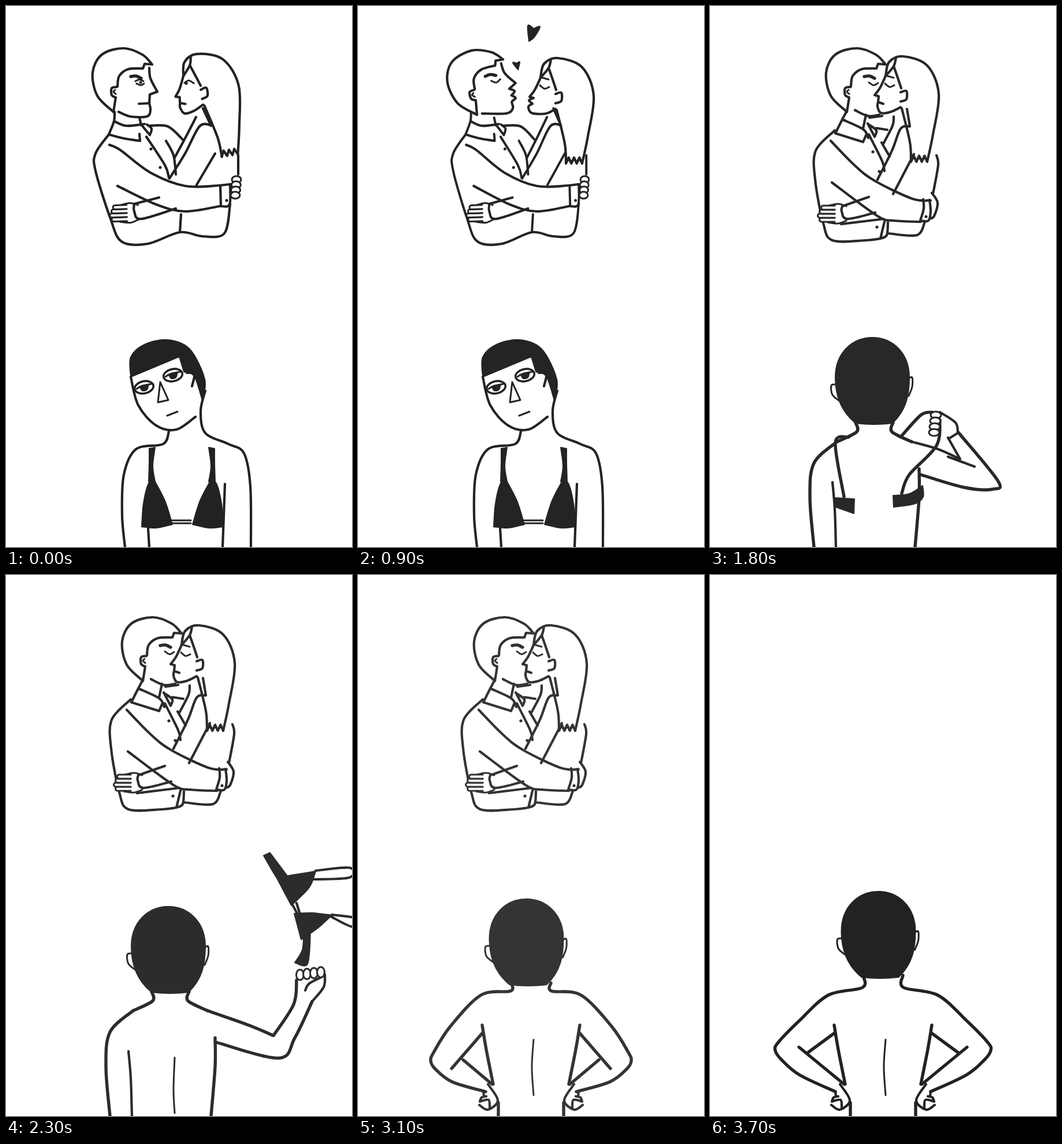
These frames come from a looping animation (599 by 935 pixels, 4.2 s). An HTML page:

```html
<!DOCTYPE html>
<html lang="en">
<head>
<meta charset="utf-8">
<title>Embrace</title>
<style>
html, body { margin: 0; width: 100%; height: 100%; overflow: hidden; background: #fff; }
svg { display: block; width: 100%; height: 100%; fill: none; stroke: currentColor; stroke-linecap: round; stroke-linejoin: round; }
</style>
</head>
<body>
<svg id="stage" viewBox="0 0 599 935"></svg>
<script>
const THIN = 3, PEN = 4.2, BOLD = 5.4;

// Smooth curve through key points; "!" marks a corner, a final "z" closes.
function curve(stroke) {
  const words = stroke.trim().split(' ');
  const closed = words.at(-1) === 'z';
  if (closed) words.pop();
  const pts = words.map(w => ({ p: w.replace('!', '').split(',').map(Number), hard: w.endsWith('!') }));
  const last = pts.length - 1;
  const at = i => closed ? pts.at(i % pts.length) : pts[Math.max(0, Math.min(last, i))];
  let d = 'M' + pts[0].p;
  for (let i = 0; i < last + closed; i++) {
    const a = at(i), b = at(i + 1);
    const before = a.hard ? a : at(i - 1), after = b.hard ? b : at(i + 2);
    const c1 = a.p.map((v, k) => v + (b.p[k] - before.p[k]) / 6);
    const c2 = b.p.map((v, k) => v - (after.p[k] - a.p[k]) / 6);
    d += `C${c1} ${c2} ${b.p}`;
  }
  return d;
}

const path = (d, width, fill = 'none') => `<path d="${d}" stroke-width="${width}" fill="${fill}"/>`;
const line = (text, width = PEN) => path(text.split('/').map(curve).join(''), width);
const solid = text => path(curve(text), 2, 'currentColor');
const group = (move, art) => `<g transform="${move}">${art}</g>`;
const shift = (x, y, art) => group(`translate(${x} ${y})`, art);
const mirror = (sum, art) => group(`matrix(-1 0 0 1 ${sum} 0)`, art);
const squeeze = (k, art) => group(`translate(${362 * (1 - k)}) scale(${k} 1)`, art);
const repeat = (count, draw) => Array.from({ length: count }, (_, i) => draw(i)).join('');
const oval = (x, y, rx, ry, fill, width = THIN) =>
  `<ellipse cx="${x}" cy="${y}" rx="${rx}" ry="${ry}" fill="${fill}" stroke-width="${width}"/>`;
const dot = (x, y) => oval(x, y, 1.6, 1.6, 'currentColor', 2);

const hand = (x, y, angle) => group(`translate(${x} ${y}) rotate(${angle})`,
  line('0,-12 14,-17 32,-15/0,13 14,17 30,14', THIN) +
  repeat(4, i => path(`M20,${i * 7 - 14}H${46 - 3 * Math.abs(i - 1)}a3.5,3.5 0 0 1 0,7H20`, THIN, '#fff')));

const knuckles = (x, y, dx, dy, rx, ry) => repeat(4, i => oval(x + dx * i, y + dy * i, rx, ry, '#fff'));

function spikes(x, y, width, count, depth) {
  const step = width / count / 2;
  return line(repeat(count * 2 + 1, i => `${x - step * i},${y - (i % 2 ? depth : 0)}! `));
}

// Heads, turned about the nape and the chin.
const manMouth = {
  calm: '248,107 250,125 262,148! 249,153! 248,168! 230,169/248,168 250,180 244,191 215,191 195,183',
  pucker: '248,107 250,125 264,146! 251,153! 259,159 252,165! 258,171 250,176 249,187 236,193 195,183',
  open: '248,107 254,122 268,144! 251,153! 256,162 244,171! 256,176 253,187 240,190 215,187',
  kiss: '200,180 222,190 242,188'
};
const manEye = {
  open: line('224,130 231,127 238,130/226,134 233,137 239,134', THIN) + dot(233, 132),
  shut: line('224,132 232,137 240,133', THIN)
};
const man = (x, y, angle, mouth, eye) => group(`translate(${x} ${y}) rotate(${angle}) translate(-186 -183)`,
  line('186,183 158,155 150,115 166,84 203,73 236,84 253,101! 240,100! 237,108! 212,109 196,121 193,139') +
  line('192,140 183,142 183,154 190,158! 186,183') + line('189,145 186,148 190,152', THIN) +
  line('216,122 225,121 234,125', BOLD) + line(manMouth[mouth]) + manEye[eye]);

const womanMouth = {
  calm: '304,159! 303,169! 312,172/303,169 302,177 308,188 325,186 342,178',
  pucker: '304,159! 296,163 302,169! 295,174 301,185 325,186 342,178',
  open: '304,159! 299,166 306,172! 297,178 302,187 325,186 342,178'
};
const womanEye = {
  open: line('316,136 324,133 332,139', THIN) + dot(319, 137),
  shut: line('315,137 323,143 331,140/316,123 330,127', THIN)
};
const woman = (x, y, angle, mouth, eye) => group(`translate(${x} ${y}) rotate(${angle}) translate(-306 -187)`,
  line('316,124 322,100 346,90 388,106 408,155 398,225 388,272/360,272 358,238 344,180') +
  spikes(388, 272, 28, 3, 10) +
  line('334,92 330,107 316,124/330,107 337,127 343,145/342,152 352,150 352,164 342,168') +
  line('316,124 306,145 297,157! ' + womanMouth[mouth]) + womanEye[eye]);

// Couple
const hug =
  line('188,183 187,199 178,222! 205,229 232,233! 231,221/187,199 208,207 240,204/235,206 249,223! 252,212 244,205/231,193 234,206') +
  line('178,222 155,255 155,285 180,365 200,407 245,411 301,391 340,398 378,393 388,342/303,360 301,391') +
  line('179,240 198,249 250,288 310,311 371,310/193,311 260,343 310,355 370,346') +
  line('371,310! 372,346! 387,343 388,308! 371,310') + knuckles(399, 300, -.7, 9, 8, 6) +
  line('243,226 275,275 282,297/247,207 280,208 306,231/277,233 290,258 294,291') +
  line('329,192 312,225 292,262/355,206 335,208 310,255 283,298/362,255 330,309/341,177 355,207/402,258 402,291') +
  line('265,331 222,342! 222,355 234,368 294,350') + hand(229, 357, 178) +
  dot(251, 247) + dot(267, 279) + dot(382, 336);
const leaning = group('matrix(.933 0 0 1 20.2 0)', hug);

const kiss = man(237, 183, 0, 'kiss', 'shut') + woman(294, 184, 0, 'calm', 'shut') +
  line('236,183 229,196 217,220! 265,235! 271,221/229,196 265,213 274,228/270,188 265,212/273,203 285,226! 288,215 275,205/276,193 298,190/288,211 307,214') +
  line('216,215 183,250 182,300 196,375 212,405 270,405 295,402! 302,373/308,374 306,396 295,402/227,377 300,368/309,393 358,396 372,373') +
  line('209,233 250,275 285,302 350,333 382,336/211,305 290,363 320,371 365,373') +
  line('369,334 370,350 364,371! 378,371 382,355 380,335/384,323 394,340 388,363 380,368') +
  line('275,222 298,268 302,285/297,236 311,260/318,191 316,207 300,238/346,208 330,212 315,250 290,300/353,256 317,325/341,178 346,208/392,258 395,275 386,325') +
  line('275,330 229,346! 228,355 238,368 286,357') + hand(236, 359, 180) +
  dot(282, 252) + dot(293, 286) + dot(374, 364) + dot(289, 382);

const manReach = man(46, 208, -31, 'open', 'open') +
  line('47,213 48,241! 97,243! 95,221 72,222 47,214/85,190 92,208 108,225! 117,222 95,209') +
  line('48,241 30,270 50,325 108,408 145,408 205,375! 202,343/188,343 197,378') +
  line('104,209 145,206 205,216 234,213/122,213 158,245 182,292/165,250 215,256 243,250') +
  line('54,261 145,292 238,286/82,325 160,341 246,320') +
  line('234,213! 243,249! 259,240 254,212! 234,213/238,286! 246,319! 262,311 255,281! 238,286') +
  hand(261, 225, -4) + hand(264, 293, -16) +
  repeat(2, i => dot(122 + 25 * i, 247 + 27 * i)) + dot(184, 360) + dot(255, 308);

const womanReach = woman(512, 208, 6, 'open', 'open') +
  line('525,208 523,233 512,247/404,212 465,237 523,233/394,240 440,260 480,264/404,212 394,240') +
  line('388,270 430,274 475,272 548,240/383,297 465,310 532,284/388,270 383,297') +
  line('460,312 435,388! 460,405 505,423! 540,375 575,300', BOLD) +
  hand(398, 225, 200) + hand(386, 283, 214);

const reach = (left, right) => shift(left, 0, manReach) + shift(right, 0, womanReach);

const hearts = solid('296,61! 294,34 304,39! 315,36 305,54 z') + solid('277,110! 268,98 275,99! 280,97 z');

// Third figure, from the front
const eye = (x, y) => group(`translate(${x} ${y}) rotate(-12)`,
  oval(0, 0, 16.5, 10.5, 'none', 3.6) + line('-13,0 -4,-3 14,-3', THIN) + solid('-7,-2! -4,5 4,5 8,-2! z'));

const strap = solid('248,765! 258,763! 254,795 258,822! 247,822! 248,790 z');
const cup = solid('258,822! 247,825 238,860 235,900! 260,902 288,896! 275,855 z');

const front =
  solid('216,641! 216,607 240,585 280,577 318,593 344,645 340,682! 326,640 308,632! 300,606! z') +
  line('216,641 229,690 260,725 295,732 328,710/282,735 272,757 225,766 204,810 201,880 206,935') +
  line('345,665 337,700 345,738 385,757 412,773 423,830 424,935/246,902 248,935/379,826 375,935/313,634 326,636 322,657') +
  line('267,650 263,685! 281,681! 267,650/279,708 297,701/287,889 320,889/287,894 320,894', THIN) +
  eye(239, 659) + eye(289, 638) + strap + cup + mirror(609, strap) + mirror(611, cup);

// Third figure, from behind
const backHead =
  path('M252,721C226,700 217,672 217,642C217,600 246,573 281,573C316,573 345,600 345,642C345,672 340,698 316,721Q283,725 252,721Z', 2, 'currentColor') +
  line('217,654 210,656 212,672 226,684/344,644 350,642 350,658 344,674', THIN);
const neck = line('252,720 254,736 220,753', BOLD);
const hangingArm = line('220,753 180,790 173,850 180,935', BOLD);
const body = backHead + neck + hangingArm + mirror(569, neck) +
  line('212,823 216,870 218,935') + line('362,800 362,850 355,935', BOLD);
const spine = line('292,834 290,890 292,930', THIN);
const armDown = mirror(569, hangingArm);

const dressed = body + line('240,745 217,755 232,848', BOLD) +
  solid('217,850! 250,852! 249,877! 218,866! z') + solid('317,846! 345,843 368,829! 369,848 355,860 318,866! z');

const pullArm = line('349,753 395,766 433,783! 412,746/412,779 458,796') +
  line('365,810 440,832 490,835 498,820 430,737/330,745 365,707 385,702/332,842 345,810 392,760 398,715', BOLD) +
  line('398,702 425,720 429,738! 413,748') + knuckles(391, 707, -1, 10, 9, 6);

const throwArm =
  line('349,753 420,778 463,796! 498,742 503,700/365,808 472,835 500,800 530,737', BOLD) +
  line('552,690 550,712 530,737/548,694 525,706 518,718') + knuckles(509, 691, 12, -1.5, 6.5, 9);

const bra =
  solid('446,485! 457,480! 487,520! 474,530 z') + solid('469,524! 487,520 536,512! 525,540 494,571! z') +
  solid('499,585! 530,584 564,588! 540,610 511,630! z') + solid('515,622! 527,618! 522,672 500,670! 513,648 z') +
  line('536,511 595,506 594,523 530,526/496,570 503,583/503,567 508,583/564,587 615,595 600,608 562,590');

// Hands on hips; k runs from raised (0) to lowered (1) shoulders.
function hips(k) {
  const p = (x, y, dx = 0, dy = 0) => `${x + dx * k},${y + dy * k} `;
  const side =
    line(p(265, 692, 0, 13) + p(264, 713, 0, 6) + p(205, 726, 8) + p(155, 770, 5, 10) + p(118, 808, 13, 17) +
      p(113, 822, 13, 18) + p(124, 838, 10, 16) + p(155, 864, 8, 12) + p(217, 893, 4), BOLD) +
    line('215,778 222,820 234,880/215,792 ' + p(170, 825, -8, 28) + '/' + p(154, 816, 28, 22) + '232,880/243,912 243,935', BOLD) +
    line('225,880 242,908 225,924 210,916/217,892 218,901/228,920 226,907 211,910! 214,903 222,901');
  return shift(10.5, -26 + 13 * k, backHead) + side + mirror(599, side) + line('304,803 301,850 304,899', THIN);
}

const calm = hug + man(186, 183, 0, 'calm', 'open') + woman(307, 185, -9, 'calm', 'open');
const lean = leaning + man(196, 187, -6, 'calm', 'open') + woman(306, 187, -3, 'calm', 'open');
const pucker = leaning + man(206, 188, -14, 'pucker', 'shut') + woman(306, 187, 0, 'pucker', 'shut');
const bare = body + spine;

const steps = [
  [0, calm + front],
  [200, lean + front],
  [700, pucker + front],
  [900, pucker + hearts + front],
  [1400, kiss + dressed + armDown + line('330,745 350,775 338,845', BOLD)],
  [1600, kiss + dressed + squeeze(.62, pullArm)],
  [1800, kiss + dressed + pullArm],
  [2000, kiss + bare + squeeze(.83, throwArm) + group('matrix(-.7 0 0 .7 838 213)', bra)],
  [2200, kiss + bare + throwArm + group('rotate(-20 512 676)', bra)],
  [2300, kiss + bare + throwArm + bra],
  [2400, kiss + bare + throwArm + shift(90, -40, bra)],
  [2500, kiss + bare + armDown],
  [2600, kiss + hips(0)],
  [2700, kiss + hips(1)],
  [2900, kiss + hips(0)],
  [3100, kiss + hips(1)],
  [3300, reach(18, -16) + hips(0)],
  [3400, reach(0, 0) + hips(0)],
  [3500, reach(-220, 170) + hips(0)],
  [3700, hips(0)]
];

// The ink fades slowly until the couple is gone.
function ink(t) {
  const grey = t < 3700 ? Math.round(34 + 22 * (t / 3400) ** 2) : 34;
  return `rgb(${grey},${grey},${grey})`;
}

const stage = document.getElementById('stage');
stage.innerHTML = steps.map(([t, art]) => `<g color="${ink(t)}" display="none">${art}</g>`).join('');
const scenes = [...stage.children];
const loop = 4200;
const start = performance.now();
let shown = -1;

function tick() {
  const t = (performance.now() - start) % loop;
  const now = steps.findLastIndex(step => step[0] <= t);
  if (now !== shown) {
    scenes.forEach((scene, i) => scene.setAttribute('display', i === now ? 'inline' : 'none'));
    shown = now;
  }
  requestAnimationFrame(tick);
}
tick();
</script>
</body>
</html>
```
